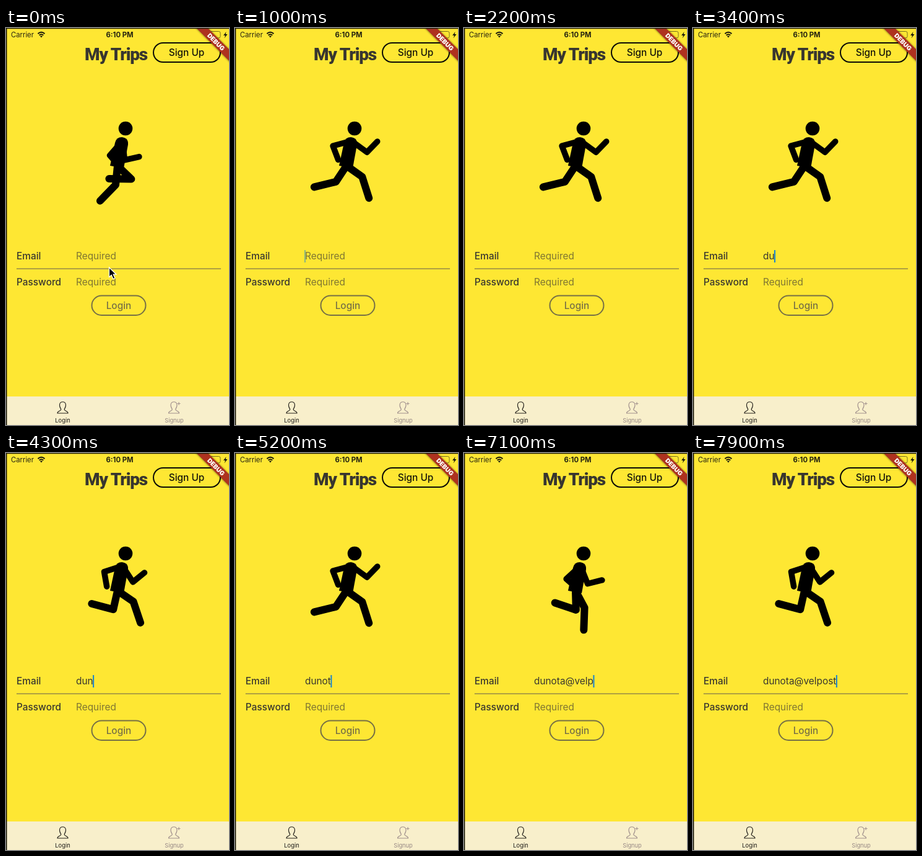
Write an HTML page that moves like this. It is 360 px wide and 640 px high and loops after 8 s.

```html
<!DOCTYPE html>
<html lang="en">
<head>
<meta charset="utf-8">
<title>Login screen</title>
<style>
  html, body { margin: 0; width: 100%; height: 100%; overflow: hidden; background: #fee733; }
  svg { display: block; width: 100vw; height: 100vh; }
  text { font-family: Inter, "Liberation Sans", sans-serif; fill: #38362f; }
  .body { font-size: 15.4px; }
  .label { font-weight: 500; }
  .hint { fill: #7f7532; }
  .mid { text-anchor: middle; }
  .status { font-size: 11.3px; fill: #24220f; }
  .tab { font-size: 9.3px; }
  .title { font: 900 28px Roboto, "Open Sans", sans-serif; letter-spacing: -1.2px; }
  .limb { fill: none; stroke: #000; stroke-linecap: round; stroke-linejoin: round; }
</style>
</head>
<body>
<svg viewBox="0 0 360 640" xmlns="http://www.w3.org/2000/svg">
  <defs>
    <path id="person" d="M-8.500 9C-8.500 5-3 6-2.700 3C-2.700 1.500-5 0-5-4C-5-11 5-11 5-4C5 0 2.700 1.500 2.700 3C3 6 8.500 5 8.500 9Z" fill="none" stroke-width="1.200" stroke-linejoin="round"/>
    <filter id="soft" x="-20%" y="-60%" width="140%" height="220%"><feGaussianBlur stdDeviation="1.800"/></filter>
  </defs>
  <rect width="360" height="640" fill="#fee733"/>

  <text class="status" x="8" y="15">Carrier</text>
  <g fill="none" stroke="#18170c" stroke-width="2">
    <path d="M51.500 9.200Q57 4.200 62.500 9.200"/>
    <path d="M53.700 11.700Q57 8.800 60.300 11.700"/>
  </g>
  <path d="M55 13.200Q57 11.700 59 13.200L57 15.500Z" fill="#18170c"/>
  <text class="status mid" x="183.500" y="15" font-weight="700">6:10 PM</text>
  <rect x="326" y="5.500" width="20" height="10.500" rx="2.500" fill="none" stroke="#77701f"/>
  <path d="M355.500 6L351 12H354L352.500 16.500L357.500 10H354.500Z" fill="#18170c"/>

  <text class="title mid" x="177.500" y="52">My Trips</text>
  <rect x="238" y="24" width="108" height="31" rx="15.500" fill="none" stroke="#0c0b05" stroke-width="2"/>
  <text class="body label mid" x="291.500" y="45" style="fill:#15140a">Sign Up</text>

  <g transform="translate(339 22.500) rotate(45)">
    <rect x="-45" y="-6.500" width="90" height="13.500" fill="#000" opacity=".5" filter="url(#soft)"/>
    <rect x="-45" y="-6.500" width="90" height="13" fill="#ae321f"/>
    <text class="mid" y="3.600" font-size="10" font-weight="900" style="fill:#fff">DEBUG</text>
  </g>

  <g id="runner">
    <circle cx="193" cy="162" r="11.300"/>
    <path d="M176 185Q178 176 187 176Q198 177 197 188L190 226L168 222Z"/>
  </g>

  <text class="body label" x="17" y="373">Email</text>
  <text class="body hint" id="hint" x="113" y="373">Required</text>
  <text class="body" id="email" x="113" y="373"></text>
  <rect id="caret" y="358" width="2" height="20" fill="#1683d2"/>
  <path d="M17 388.200H347" stroke="#80774a" stroke-width="1.200"/>
  <text class="body label" x="17" y="415">Password</text>
  <text class="body hint" x="113" y="415">Required</text>
  <rect x="138.500" y="431.500" width="87" height="31.500" rx="15.700" fill="none" stroke="#777045" stroke-width="2"/>
  <text class="body label mid" x="182" y="452.500" style="fill:#777045">Login</text>

  <rect y="594" width="360" height="46" fill="#f8efcb"/>
  <use href="#person" x="91.500" y="612" stroke="#25221c"/>
  <text class="tab mid" x="91.500" y="635.500" style="fill:#1d1b17">Login</text>
  <g stroke="#a08f8c">
    <use href="#person" x="271" y="612"/>
    <path d="M276.500 605.500H281.500M279 603V608" fill="none"/>
  </g>
  <text class="tab mid" x="271.500" y="635.500" style="fill:#988985">Signup</text>

  <path d="M.750 0V640M0 .500H360" stroke="#1b1908" stroke-width="1.500"/>
  <path id="pointer" d="M0 0V15.500L3.700 12.200L6.500 18.500L9.500 17.200L6.700 11.200H11.500Z" fill="#000" stroke="#fff" stroke-width="1.200"/>
</svg>
<script>
const LOOP = 8000, STRIDE = 600, FOCUS = 500;
const ADDRESS = "dunota@velpost";
const TYPING = { start: 2700, slow: 600, fast: 200 };
const $ = id => document.getElementById(id);
const mix = (a, b, k) => a + (b - a) * k;
const clamp = v => Math.max(0, Math.min(1, v));
const wave = turns => Math.cos(turns * 2 * Math.PI);

// Knee flexion through one stride: push off, kick, fold, fold, reach, land.
function kneeBend(turn, kick) {
  const keys = [38, kick, 110, 138, 37, 30];
  const p = turn * keys.length, i = Math.floor(p);
  return -mix(keys[i], keys[(i + 1) % keys.length], p - i);
}

// Angles are in degrees from straight down, positive towards the front.
const leg = (offset, lean, swing, kick) => ({
  offset, lean, swing, peak: .617, root: [180, 222], upper: 31, lower: 36, width: 12,
  bend: turn => kneeBend(turn, kick)
});
const arm = (offset, lean, swing, flex) => ({
  offset, lean, swing, peak: 2 / 3, root: [188, 182], upper: 31, lower: 24, width: 9.5,
  bend: () => flex
});
const limbs = [leg(0, 21, 35.5, 92), leg(.5, 11, 47, 42), arm(0, -9, 63, 82), arm(.5, -21, 54, 96)];

for (const limb of limbs) {
  limb.path = document.createElementNS("http://www.w3.org/2000/svg", "path");
  limb.path.setAttribute("class", "limb");
  limb.path.setAttribute("stroke-width", limb.width);
  $("runner").append(limb.path);
}

function step([x, y], degrees, length) {
  const a = degrees * Math.PI / 180;
  return [x + length * Math.sin(a), y + length * Math.cos(a)];
}

function drawLimb(limb, t) {
  const turn = (t / STRIDE + limb.offset) % 1;
  const angle = limb.lean + limb.swing * wave(turn - limb.peak);
  const joint = step(limb.root, angle, limb.upper);
  const tip = step(joint, angle + limb.bend(turn), limb.lower);
  limb.path.setAttribute("d", `M${limb.root}L${joint}L${tip}`);
}

// The name is typed slowly, everything after the @ quickly.
function keyTime(i) {
  const at = ADDRESS.indexOf("@");
  return TYPING.start + Math.min(i, at) * TYPING.slow + Math.max(i - at, 0) * TYPING.fast;
}

function caretOpacity(t, since) {
  if (t < FOCUS) return 0;
  const p = (t - since) % 1000;
  return p < 750 ? clamp((500 - p) / 150 + .5) : clamp((p - 1000) / 150 + 1);
}

function render(t) {
  limbs.forEach(limb => drawLimb(limb, t));

  const typed = [...ADDRESS].filter((_, i) => keyTime(i) <= t).length;
  const email = $("email"), caret = $("caret");
  email.textContent = ADDRESS.slice(0, typed);
  $("hint").style.display = typed ? "none" : "";
  caret.setAttribute("x", 112 + (typed ? email.getComputedTextLength() + .5 : 0));
  caret.style.opacity = caretOpacity(t, typed ? keyTime(typed - 1) : FOCUS);

  const pointer = $("pointer"), k = clamp(t / 350);
  pointer.style.display = t < 700 ? "" : "none";
  pointer.setAttribute("transform", `translate(166.500 ${mix(386, 370, k * k * (3 - 2 * k))})`);
}

const start = performance.now();
function tick() {
  render((performance.now() - start) % LOOP);
  requestAnimationFrame(tick);
}
tick();
</script>
</body>
</html>
```
